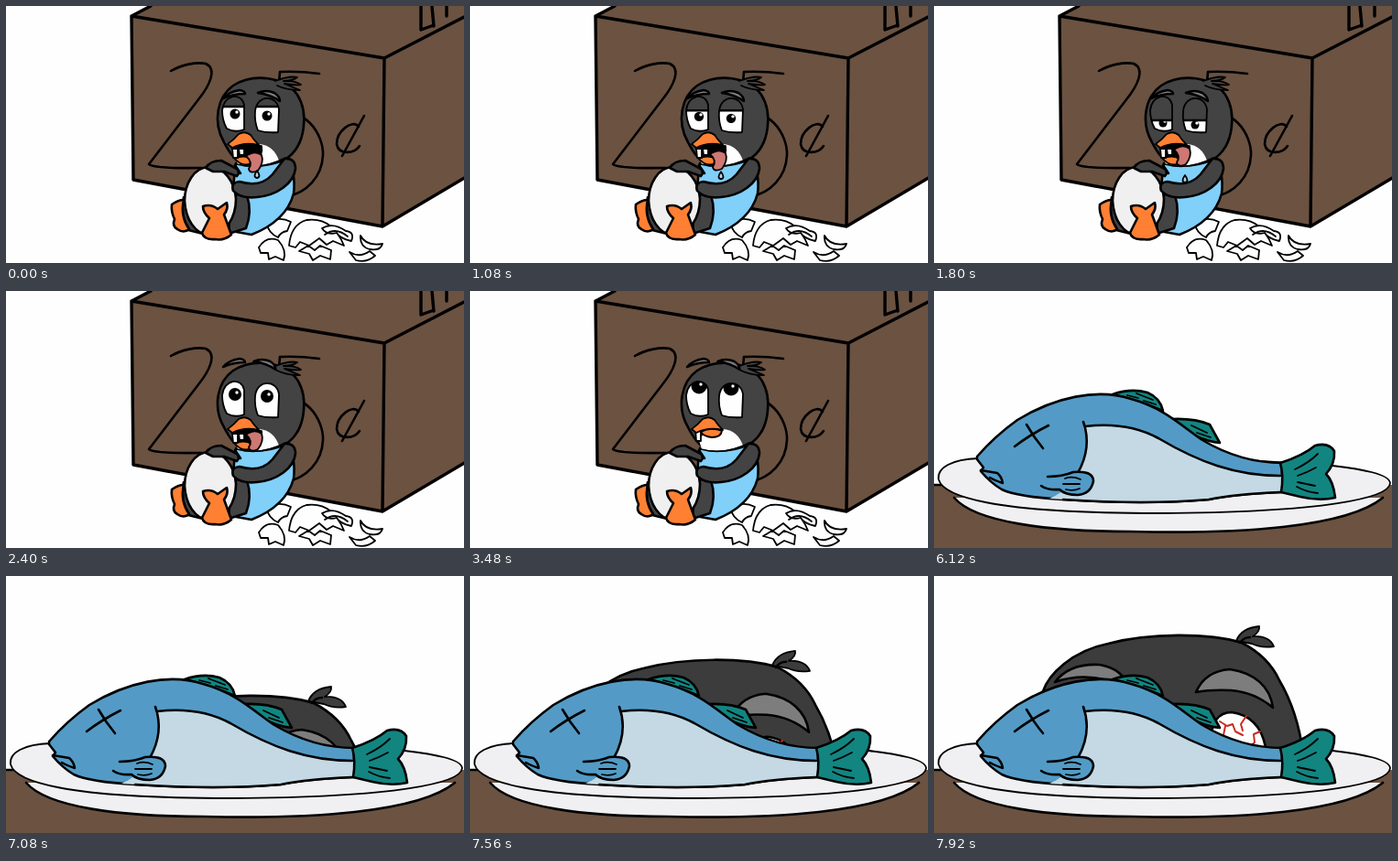
These frames come from a looping animation (500x281 px, 8 s). An HTML page:

```html
<!DOCTYPE html>
<html lang="en">
<head>
<meta charset="utf-8">
<title>Fish stand</title>
<style>
  html, body { margin: 0; width: 100%; height: 100%; overflow: hidden; background: #fefefe; }
  svg { display: block; width: 100%; height: 100%; }
  .ink { fill: none; stroke: #000; stroke-width: 2.6; stroke-linecap: round; stroke-linejoin: round; }
  .thin { stroke-width: 1.8; }
  .bold { stroke-width: 3.4; }
  .wood { fill: #6b5241; }
  .dark { fill: #434343; }
  .head { fill: #3c3c3c; }
  .grey { fill: #7d7d7d; }
  .white { fill: #fefefe; }
  .shell { fill: #f0f0f0; }
  .orange { fill: #ff8033; }
  .sky { fill: #80d0fa; }
  .tongue { fill: #cf7773; }
  .blue { fill: #539bc6; }
  .pale { fill: #c4d9e4; }
  .teal { fill: #128581; }
  .plate { fill: #f0f0f2; }
  .black { fill: #000; }
</style>
</head>
<body>
<svg viewBox="0 0 500 281" preserveAspectRatio="none">
  <defs>
    <path id="eyeL" d="M236 114C238 96 257 94 260 108L260 135Q250 139 241 134Q236 125 236 114Z"/>
    <path id="eyeR" d="M272 115C274 96 296 97 298 113L297 138Q284 139 275 136Q271 126 272 115Z"/>
    <clipPath id="eyes"><use href="#eyeL"/><use href="#eyeR"/></clipPath>
    <clipPath id="behindPlate"><path d="M0 0H500V192H370L300 205H90V0Z"/></clipPath>
  </defs>

  <g id="corner" class="ink">
    <path class="wood" stroke="none" d="M137 11L158 0H500V187L411 241L139 190Z"/>
    <path class="bold" d="M158 0L137 11L413 57L500 12M137 11L139 190L411 241L502 187M413 57L411 241"/>
    <path class="bold" d="M453 0V26M465 0L467 22M481 0V11M453 26L467 21"/>
    <path d="M180 71C192 64 208 61 218 63C231 69 222 87 211 101L156 173Q162 178 214 177M342 74Q320 71 299 72L295 119C325 108 347 140 346 163C345 188 327 204 308 208"/>
    <path d="M385 132C378 123 361 137 361 151C363 163 380 162 386 153M391 120L367 164"/>
    <g class="white thin">
      <path d="M285 238Q297 229 311 236L307 246Q300 247 297 253Q286 248 285 238Z"/>
      <path d="M276 264Q284 251 297 256Q307 267 303 278L294 274L287 277L286 270L278 270Z"/>
      <path d="M309 262Q311 239 328 234Q356 230 369 262L357 257L350 261L342 254L331 262L321 258L316 264Z"/>
      <path d="M320 268L330 262L337 267L343 262L355 267L354 277L343 273L335 278L331 271Z"/>
      <path d="M345 243Q357 236 371 246Q381 247 377 257Q364 254 361 248Q350 251 345 243ZM348 250Q360 241 373 252"/>
      <path d="M387 251Q393 263 411 260Q409 268 397 266Q386 263 387 251ZM375 269Q386 276 397 268L403 273Q394 281 382 278Z"/>
    </g>

    <path class="sky" d="M251 172L305 164Q317 180 314 205Q306 235 268 250L246 246Q247 199 251 172Z"/>
    <path class="dark" d="M238 149C225 126 231 99 248 87C270 73 304 77 318 97C330 116 328 152 306 167Q285 177 260 174Q248 169 238 149Z"/>
    <path class="white" stroke="none" d="M249 160L276 151Q292 152 298 169Q275 178 253 173Z"/>
    <path class="thin" d="M252 173Q278 180 305 166"/>
    <path class="dark thin" d="M294 82Q309 76 318 78Q313 82 303 82Q315 81 322 86Q315 87 304 85L321 92Q306 92 296 87"/>

    <g clip-path="url(#eyes)">
      <rect class="white" stroke="none" x="230" y="90" width="75" height="55"/>
      <circle id="pupilL" class="black" stroke="none" cx="250"/>
      <circle id="pupilR" class="black" stroke="none" cx="285"/>
      <circle id="glintL" class="white" stroke="none" cx="252" r="1.7"/>
      <circle id="glintR" class="white" stroke="none" cx="287" r="1.7"/>
      <rect id="lids" class="dark" x="225" y="50" width="85" height="60"/>
    </g>
    <g class="thin"><use href="#eyeL"/><use href="#eyeR"/></g>
    <path id="browL" class="grey" d="M237 101Q243 94 255 92Q261 93 261 96Q248 96 237 101Z"/>
    <path id="browR" class="grey" d="M275 95Q284 91 293 95Q299 99 299 104Q289 97 275 95Z"/>

    <g id="openMouth">
      <path class="black thin" d="M246 154Q263 149 279 153Q281 164 272 170L255 166Z"/>
      <path class="orange thin" d="M250 167Q259 162 268 167L266 173Q256 175 250 167Z"/>
      <path id="tongue" class="tongue thin" d="M262 161Q272 154 279 160Q282 168 275 177Q266 181 265 175Q270 168 262 161Z"/>
      <path class="white thin" d="M247 156H253V166H248ZM254 156H260V163H255Z"/>
    </g>
    <g id="smallMouth">
      <path class="white thin" d="M246 151H252V164H247Z"/>
      <path class="orange thin" d="M252 154Q263 148 275 153Q274 160 264 160Q255 159 252 154Z"/>
    </g>
    <path class="orange thin" d="M242 151Q249 146 254 140Q261 136 267 141Q271 147 276 152Q260 148 247 155Z"/>
    <path id="drop" class="thin" fill="#b8d5e5" d="M274 180Q269 187 274 188Q279 187 274 180Z"/>

    <path class="dark" d="M246 206L263 207Q269 225 262 243L243 249Z"/>
    <path class="dark" d="M194 209Q190 230 199 245L215 249V220Z"/>
    <path class="shell" d="M222 176C205 176 195 195 195 213C196 232 206 250 222 250C240 250 251 231 251 211C250 192 238 176 222 176Z"/>
    <path class="dark" d="M218 177Q223 169 235 169L252 178Q256 182 252 186L238 181L226 181Z"/>
    <path class="dark" d="M304 167Q316 166 316 178C314 194 296 207 274 209Q256 211 248 202Q245 193 255 192Q278 199 291 184Z"/>
    <path d="M250 174L256 183"/>
    <path class="orange" d="M181 217Q188 212 194 212Q190 230 200 244Q194 249 187 244Q181 241 184 233Q180 225 181 217Z"/>
    <path class="orange" d="M215 219Q224 216 231 222L241 215Q243 222 238 228L246 250Q238 257 228 255Q216 256 214 248L222 232Q215 226 215 219Z"/>
  </g>

  <g id="stand" class="ink">
    <path class="wood" d="M138 45Q230 42 322 45L402 139L505 285H-5L92 135Z"/>
    <path class="white" d="M131 87Q240 84 345 86L371 138Q240 132 107 133Z"/>
    <path d="M127 82Q240 87 346 80L396 138Q240 134 92 134M127 82L95 134M132 86L106 133M346 82L384 137M352 86L371 137"/>
    <path d="M144 55L142 73L157 74M164 58Q158 69 166 73M276 70L284 53L290 68M278 65L288 63M293 54V69Q306 65 305 59Q302 54 293 54M323 53L311 54V69L327 67M311 61L322 60"/>
    <path class="white" d="M173 58Q230 54 280 47L293 72Q230 80 168 85Z"/>
    <path class="thin" d="M185 76L183 62L199 59M184 68L195 66M204 66L206 74M203 61V61M220 61Q211 62 213 66Q222 68 219 72Q216 75 211 73M226 56L229 73Q229 64 235 66L239 72M245 54L249 65M250 70V70M254 53L257 64M259 69V69M261 52L264 63M267 67V67"/>
    <path d="M106 163C123 154 149 159 155 170C158 181 141 191 124 202L57 246Q92 244 119 248L196 249M314 163Q280 158 245 161L238 187C294 180 362 187 368 217C370 239 341 248 309 249Q266 248 246 233M416 190C404 187 388 191 389 207C392 216 411 214 427 206M396 180Q400 203 408 227"/>
  </g>

  <g id="dinner" class="ink">
    <path class="wood" stroke="none" d="M0 212H500V281H0Z"/>
    <path d="M0 212H8"/>
    <path class="plate" d="M22 226C45 253 125 263 215 263C330 266 450 259 490 226"/>
    <path class="plate thin" d="M48 183C20 184 3 193 5 206C10 224 60 243 245 243C430 242 497 226 498 210C497 200 468 195 435 191L200 176Z"/>
    <g clip-path="url(#behindPlate)">
      <g id="guest">
        <path class="head" d="M119 126C125 108 150 82 190 74C235 62 300 62 336 73Q365 88 377 114Q397 148 403 194L398 260H112Z"/>
        <path class="head thin" d="M330 71Q335 57 355 55Q356 61 348 66Q366 65 371 77Q357 79 347 74Z"/>
        <path d="M345 67Q338 67 334 73"/>
        <path class="grey" d="M132 116Q148 95 181 97Q207 102 211 121Q169 103 132 116Z"/>
        <path class="grey" d="M286 127Q296 104 323 102C350 106 367 121 370 144Q350 127 324 125Q302 124 286 127Z"/>
        <path class="white" d="M302 181Q303 149 325 149Q355 153 362 187V218H302Z"/>
        <path d="M312 159L320 164L326 162L329 170L337 174M341 153L335 162L337 169M356 170L349 173L350 182L344 187M318 164L316 174" stroke="#cc2a22" stroke-width="2"/>
      </g>
    </g>
    <path class="teal" d="M195 113Q215 106 233 111Q247 117 250 131Q224 120 195 113ZM260 140Q285 139 301 146L312 166Q300 165 284 158Z"/>
    <path class="thin" d="M211 114L223 117M221 112L239 119M229 120L242 124M281 147L298 155M287 155L302 160"/>
    <path class="blue" d="M47 181Q66 159 91 141C132 116 178 106 215 118C252 128 272 149 293 163C325 182 355 188 380 188V220Q329 222 300 228Q231 234 141 228Q91 225 74 217Q62 210 51 197L54 193L47 184Z"/>
    <path class="pale" stroke="none" d="M163 148C198 144 223 149 245 161C289 187 329 202 379 202V220Q329 222 300 228Q231 234 126 227Q154 215 163 185Q169 166 163 148Z"/>
    <path d="M163 143C170 163 166 183 157 199M165 148C198 144 223 149 245 161C289 187 329 202 378 202M141 228Q231 234 300 228Q329 222 378 220"/>
    <path d="M51 196L69 199Q74 203 75 210Q66 207 61 204"/>
    <path d="M88 170Q105 157 125 147M101 146Q109 160 119 172"/>
    <path class="blue" d="M124 203Q140 203 152 198Q174 196 174 208Q171 222 157 223Q143 223 137 217Q124 218 117 213"/>
    <path class="thin" d="M143 205Q151 202 160 206M141 211L159 211M144 217Q152 219 159 216"/>
    <path class="teal" d="M378 188Q403 180 416 169Q431 165 437 175Q438 189 428 200Q436 208 438 226Q421 230 400 225L379 220Q382 202 378 188Z"/>
    <path class="thin" d="M394 195Q409 188 419 178M397 202Q408 198 417 193M397 209L416 213M396 214Q407 220 419 221"/>
  </g>
</svg>

<script>
const LOOP = 8000, STEP = 120;
const $ = id => document.getElementById(id);
const show = (id, on) => $(id).style.display = on ? '' : 'none';
const set = (id, attrs) => { for (const k in attrs) $(id).setAttribute(k, attrs[k]); };
const shift = (id, x, y) => set(id, { transform: `translate(${x} ${y})` });

// Linear interpolation through [time, value] pairs.
function track(t, keys) {
  const next = keys.findIndex(k => k[0] > t);
  if (next < 0) return keys[keys.length - 1][1];
  if (next === 0) return keys[0][1];
  const [t0, a] = keys[next - 1], [t1, b] = keys[next];
  return a + (b - a) * (t - t0) / (t1 - t0);
}

function drawPenguin(t) {
  const pupilY = track(t, [[840, 118], [1680, 128], [1800, 128], [2400, 113], [3240, 113], [3480, 104]]);
  const pupilR = track(t, [[840, 5.5], [1680, 4.5], [1800, 4.5], [2400, 7], [3240, 7], [3480, 8.5]]);
  const lid = track(t, [[840, 110], [1680, 125], [1800, 125], [2400, 96],
    [2640, 96], [2760, 118], [2880, 128], [3000, 94]]);
  const brow = track(t, [[1800, 0], [2400, -18], [2640, -18], [2760, -12], [2880, -12], [3000, -18]]);
  for (const side of ['L', 'R']) {
    const y = pupilY + (side === 'R' ? 2 : 0);
    set('pupil' + side, { cy: y, r: pupilR });
    set('glint' + side, { cy: y - 2 });
    shift('brow' + side, side === 'R' ? brow / 4 : 0, brow);
  }
  set('lids', { y: lid - 60 });
  shift('tongue', 0, track(t, [[840, 3], [1680, -4]]));
  shift('drop', 0, track(t, [[840, 0], [1800, 5], [2280, 58]]));
  show('drop', t < 2400);
  show('openMouth', t < 3360);
  show('smallMouth', t >= 3360);
}

function draw(now) {
  const t = Math.floor(now % LOOP / STEP) * STEP;
  show('corner', t < 4200);
  show('stand', t >= 4200 && t < 6120);
  show('dinner', t >= 6120);
  drawPenguin(t);
  show('guest', t > 6240);
  shift('guest', 0, track(t, [[6240, 134], [7080, 66], [7680, 17], [7920, 0]]));
  requestAnimationFrame(draw);
}
requestAnimationFrame(draw);
</script>
</body>
</html>
```
